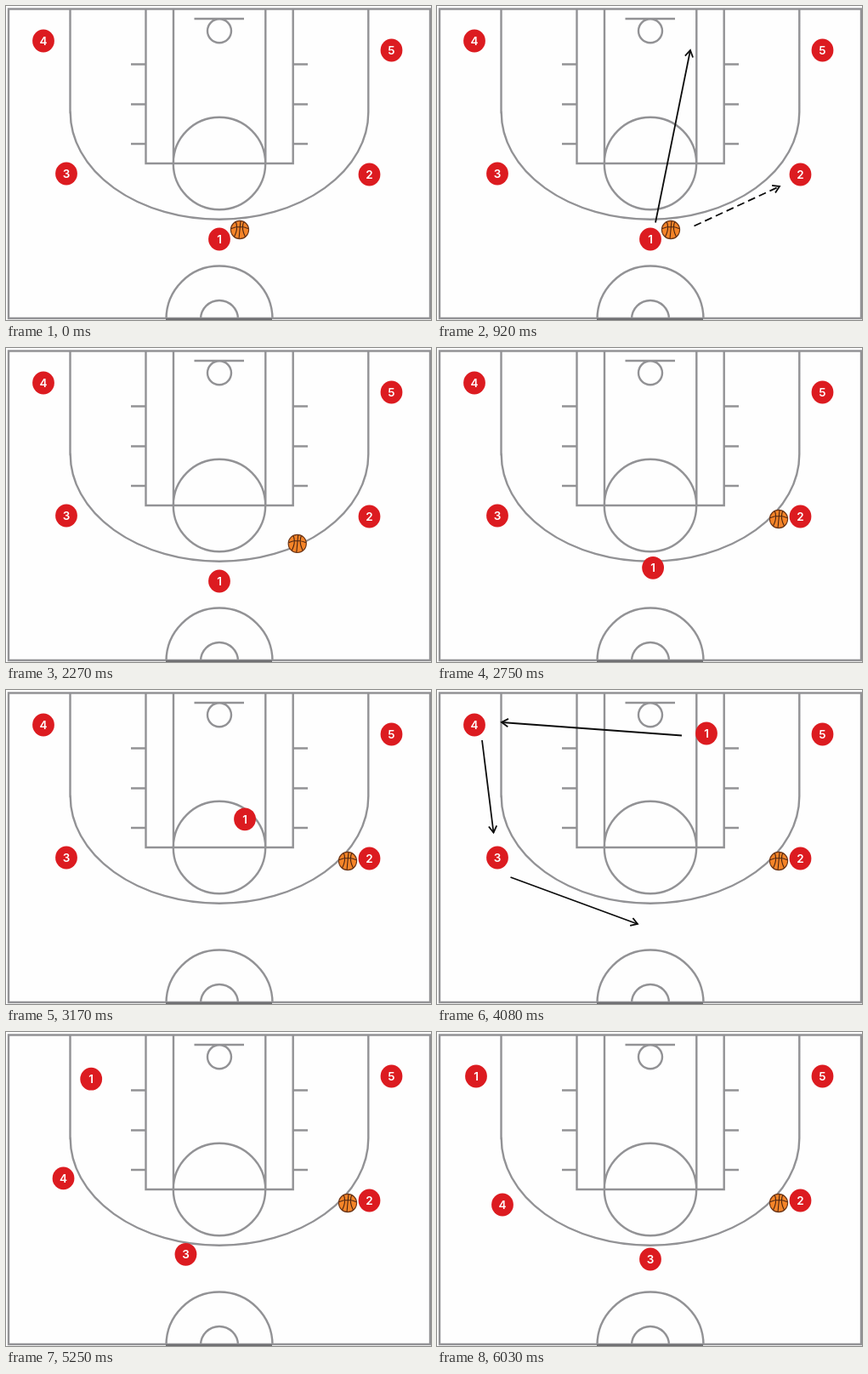
An HTML page with a canvas for the animation above (6220 ms loop, 500 by 369 pixels).

```html
<!DOCTYPE html>
<html lang="en">
<head>
<meta charset="utf-8">
<title>Basketball play</title>
<style>
  html, body { margin: 0; width: 100%; height: 100%; overflow: hidden; background: #fefefe; }
  canvas { display: block; width: 500px; height: 369px; }
</style>
</head>
<body>
<canvas id="stage" width="500" height="369"></canvas>
<script>
const ctx = document.getElementById('stage').getContext('2d');

const LOOP = 6220;
const MOVE = 900;
const STEP = 60;
const PASS_AT = 1790, CUT_AT = 2690, ROTATE_AT = 4530;
const GRAY = '#929295', RED = '#dc1b20', INK = '#0c0c0c';

// Progress of a move, advancing in steps of the picture rate
function progress(time, start) {
  const elapsed = Math.floor((time - start) / STEP) * STEP;
  return Math.min(1, Math.max(0, elapsed / MOVE));
}

// Point on a quadratic curve
function along([a, c, b], u) {
  const v = 1 - u;
  return [0, 1].map(i => v * v * a[i] + 2 * u * v * c[i] + u * u * b[i]);
}

const paths = {
  ball: [[275, 263], [338.5, 232], [402, 201]],
  cut: [[251, 274], [273.6, 156], [317, 51]],
  one: [[317, 51], [181.5, 62], [46, 52]],
  three: [[71, 197], [150, 258], [251, 267]],
  four: [[44, 41], [51.5, 126], [77, 203]]
};

function stroke(color, width, build) {
  ctx.beginPath();
  build();
  ctx.strokeStyle = color;
  ctx.lineWidth = width;
  ctx.stroke();
}

function line(x1, y1, x2, y2) {
  ctx.moveTo(x1, y1);
  ctx.lineTo(x2, y2);
}

function ring(x, y, r) {
  ctx.moveTo(x + r, y);
  ctx.arc(x, y, r, 0, Math.PI * 2);
}

function drawCourt() {
  ctx.fillStyle = '#fefefe';
  ctx.fillRect(0, 0, 500, 369);
  stroke(GRAY, 2.4, () => {
    ctx.rect(3, 3.5, 496, 363.5);
    ctx.rect(164.5, 3.5, 173.2, 181.5);
    line(197, 3.5, 197, 185);
    line(305.3, 3.5, 305.3, 185);
    for (const y of [68.5, 115.5, 162]) {
      line(147, y, 164.5, y);
      line(337.7, y, 355, y);
    }
    line(221.5, 15, 280, 15);
    ring(251, 29.3, 14);
    ring(251, 185, 54.2);
    ctx.moveTo(75.5, 3.5);
    ctx.lineTo(75.5, 125);
    ctx.ellipse(251, 125, 175.3, 125.7, 0, Math.PI, 0, true);
    ctx.lineTo(426.3, 3.5);
    for (const r of [62.5, 22]) {
      ctx.moveTo(251 - r, 368);
      ctx.arc(251, 368, r, Math.PI, 0);
    }
  });
  stroke('#6f6f72', 2, () => line(188, 368, 313, 368));
}

function drawArrow(x1, y1, x2, y2, dash = []) {
  const angle = Math.atan2(y2 - y1, x2 - x1);
  ctx.setLineDash(dash);
  stroke(INK, 1.8, () => line(x1, y1, x2, y2));
  ctx.setLineDash([]);
  stroke(INK, 1.8, () => {
    const wing = side => [x2 - 9 * Math.cos(angle + side), y2 - 9 * Math.sin(angle + side)];
    ctx.moveTo(...wing(0.55));
    ctx.lineTo(x2, y2);
    ctx.lineTo(...wing(-0.55));
  });
}

function drawPlayer(label, [x, y]) {
  ctx.fillStyle = RED;
  ctx.beginPath();
  ctx.ellipse(x, y, 12.9, 13.4, 0, 0, Math.PI * 2);
  ctx.fill();
  ctx.fillStyle = '#fff';
  ctx.font = '600 13.5px Inter, Arial, sans-serif';
  ctx.textAlign = 'center';
  ctx.textBaseline = 'alphabetic';
  ctx.fillText(label, x, y + 5);
}

function drawBall([x, y]) {
  ctx.save();
  ctx.translate(x, y);
  ctx.beginPath();
  ring(0, 0, 10.6);
  ctx.fillStyle = '#f58428';
  ctx.fill();
  ctx.clip();
  stroke('#4a2412', 1.1, () => {
    line(1, -11, -1, 11);
    ctx.moveTo(-11, -1);
    ctx.quadraticCurveTo(0, -6, 11, -1);
    for (const side of [-1, 1]) {
      ctx.moveTo(side * 5, -10);
      ctx.quadraticCurveTo(side * 1, -2, side * 7, 9);
    }
  });
  ctx.restore();
  stroke('#6b3517', 1.1, () => ring(x, y, 10.6));
}

function draw(time) {
  const rotating = time >= ROTATE_AT;
  const turn = progress(time, ROTATE_AT);

  drawCourt();
  if (time >= 920 && time < PASS_AT + STEP) {
    drawArrow(257, 254.5, 298, 52);
    drawArrow(302.5, 258.5, 403, 212, [9, 5]);
  }
  if (time >= CUT_AT + MOVE + STEP && time < ROTATE_AT + STEP) {
    drawArrow(288, 53.5, 76, 38);
    drawArrow(53, 59, 66.5, 167.5);
    drawArrow(86.5, 220, 236, 275);
  }

  drawPlayer('5', [453.5, 52]);
  drawPlayer('2', [427.5, 198]);
  drawPlayer('4', along(paths.four, turn));
  drawPlayer('3', along(paths.three, turn));
  drawPlayer('1', rotating ? along(paths.one, turn) : along(paths.cut, progress(time, CUT_AT)));
  drawBall(along(paths.ball, progress(time, PASS_AT)));
}

const start = performance.now();
function tick() {
  draw((performance.now() - start) % LOOP);
  requestAnimationFrame(tick);
}
tick();
</script>
</body>
</html>
```
